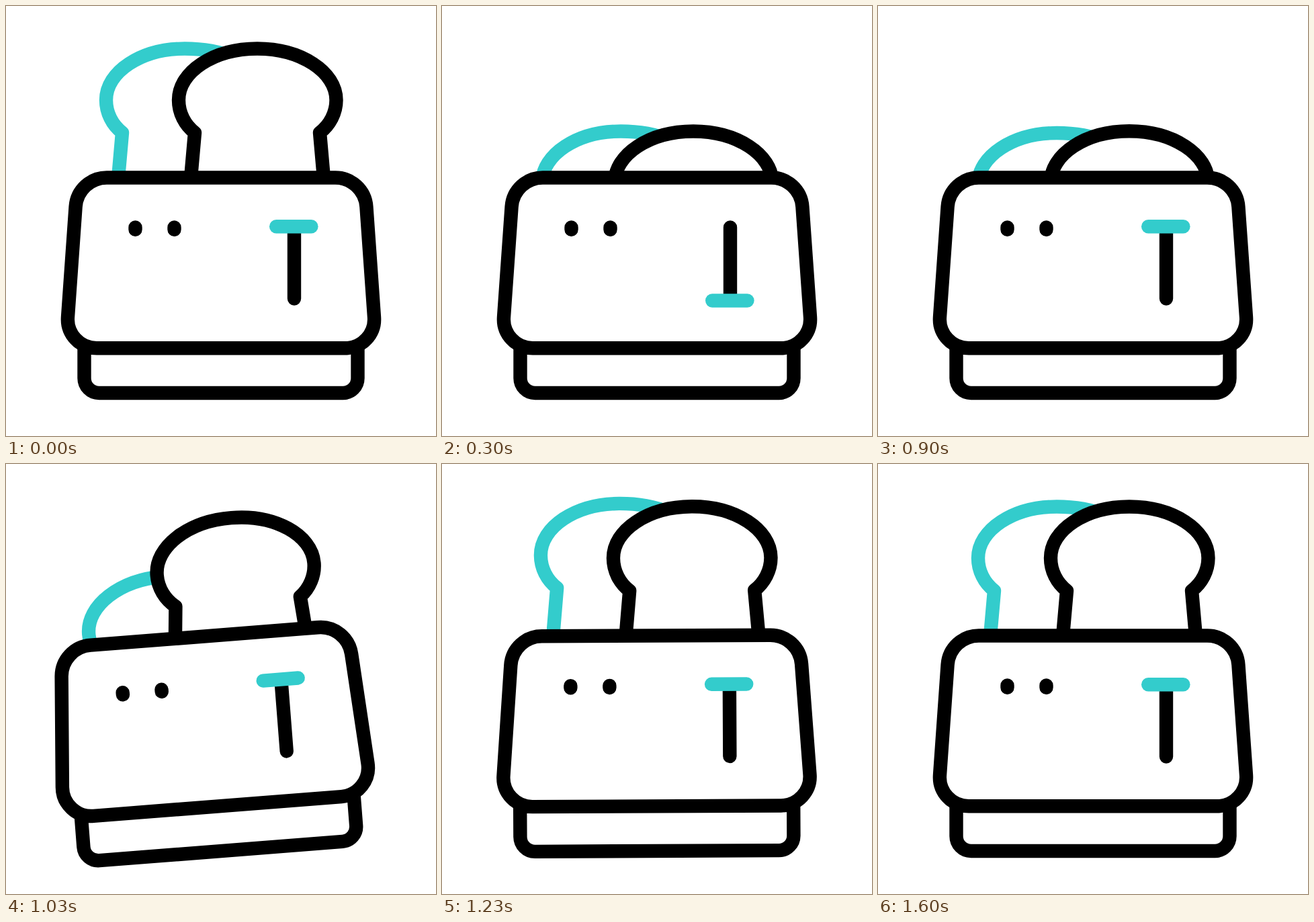
Recreate the animation shown at these times as an HTML page. Size 640 by 640 pixels, loop 1670 ms.

```html
<!DOCTYPE html>
<html lang="en">
<head>
<meta charset="utf-8">
<title>Toaster</title>
<style>
  html, body { margin: 0; height: 100%; overflow: hidden; background: #fff; }
  svg { display: block; width: 100vw; height: 100vh; }
  path { fill: #fff; stroke: #000; stroke-width: 20.4; stroke-linecap: round; stroke-linejoin: round; }
  .accent { stroke: #3cc; }
</style>
</head>
<body>
<svg viewBox="0 0 640 640">
  <g id="toaster">
    <path id="back" class="accent" d="M163 302L173 188.5C158 177 149 159 149 140C149 98 201 63.5 266 63.5Q308 63.5 340 77"/>
    <path id="front" d="M271 302L281 188.5C266 177 257 159 257 140C257 98 309 63.5 374 63.5S491.5 98 491.5 140C491.5 159 482 177 467 188.5L477 302"/>
    <path d="M116.5 505V554A22 22 0 0 0 138.5 576H501.5A22 22 0 0 0 523.5 554V505"/>
    <path d="M150.5 255.5H489.5A46.5 46.5 0 0 1 536.4 298.8L548 463A43.2 43.2 0 0 1 505 509.3H135A43.2 43.2 0 0 1 92 463L103.6 298.8A46.5 46.5 0 0 1 150.5 255.5Z"/>
    <path d="M192.5 329.5V332.7M250.5 329.5V332.7M429 329.5V435.5"/>
    <path id="lever" class="accent" d="M402.2 328.2H454.4"/>
  </g>
</svg>
<script>
  const LOOP = 1670, FPS = 30;

  // Each track is a list of [time in ms, value].
  const press = [[100, 0], [300, 123], [600, 125.5]];
  const tracks = {
    lever: [[100, 0], [300, 110.3], [600, 110.3], [733, 0]],
    front: [...press, [879, 125.5], [1133, -34], [1233, 0]],
    back: [...press, [984, 125.5], [1167, -34], [1255, 0]],
    tilt: [[955, 0], [1133, -11], [1298, 5.1], [1445, -4.2], [1600, 0]]
  };

  const ease = p => (1 - Math.cos(Math.PI * p)) / 2;

  function valueAt(track, t) {
    const next = track.findIndex(([time]) => time > t);
    if (next === 0) return track[0][1];
    if (next < 0) return track[track.length - 1][1];
    const [t0, v0] = track[next - 1], [t1, v1] = track[next];
    return v0 + (v1 - v0) * ease((t - t0) / (t1 - t0));
  }

  const setTransform = (id, value) =>
    document.getElementById(id).setAttribute("transform", value);

  function draw() {
    // The motion advances in steps of 1/30 s; the offset absorbs rounded step times.
    const t = Math.floor((performance.now() % LOOP + 4) * FPS / 1000) * 1000 / FPS;
    for (const id of ["lever", "front", "back"])
      setTransform(id, `translate(0 ${valueAt(tracks[id], t)})`);
    setTransform("toaster", `rotate(${valueAt(tracks.tilt, t)} 320 576)`);
    requestAnimationFrame(draw);
  }
  draw();
</script>
</body>
</html>
```
